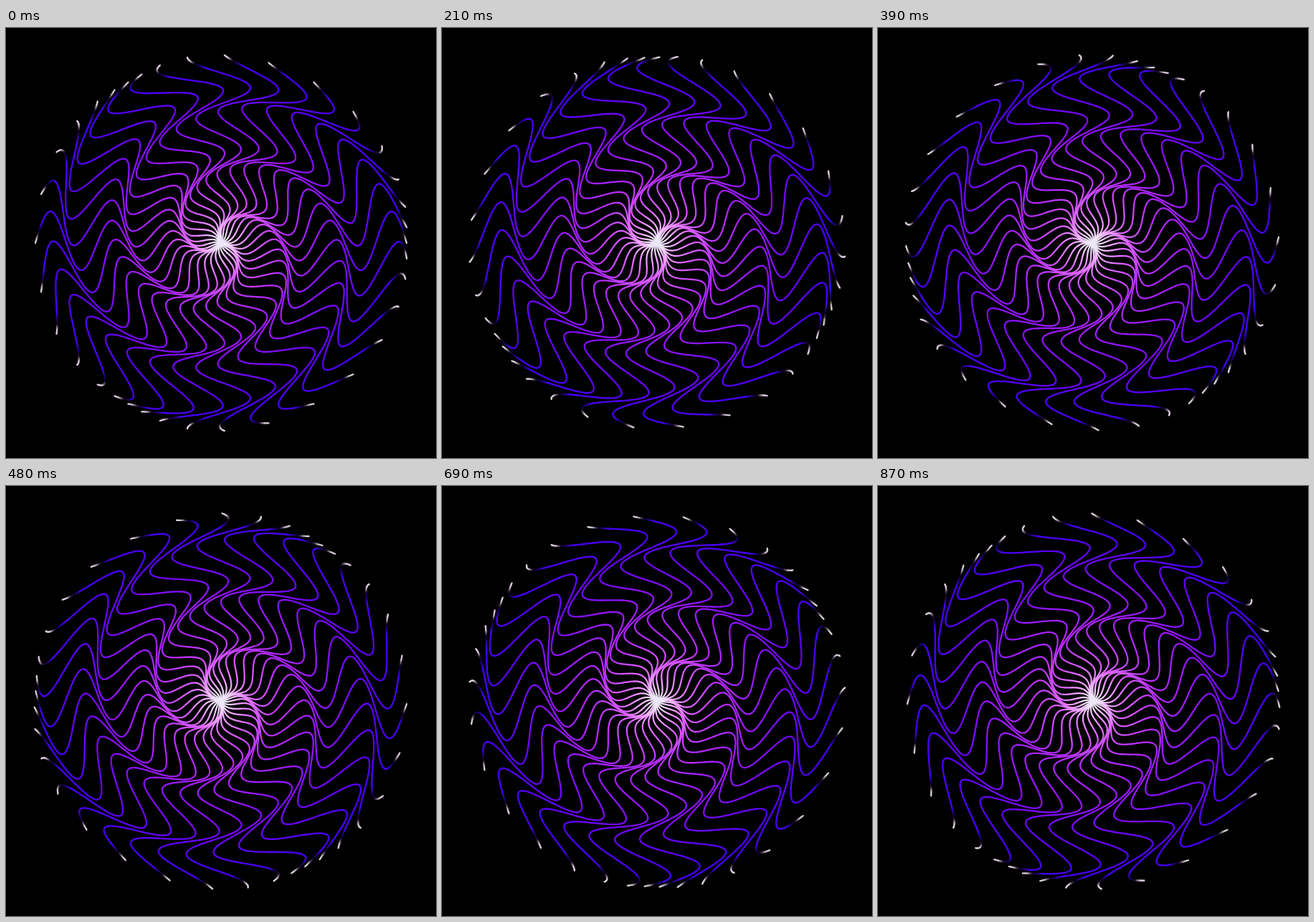
Animation, 600 px wide and 600 px high, one loop 900 ms. Source, as an HTML page with a canvas:

```html
<!DOCTYPE html>
<html lang="en">
<head>
<meta charset="utf-8">
<title>Wavy rays</title>
<style>
  html, body { margin: 0; width: 100%; height: 100%; overflow: hidden; background: #000; }
  canvas { display: block; width: 600px; height: 600px; }
</style>
</head>
<body>
<canvas id="stage" width="600" height="600"></canvas>
<script>
const ctx = document.getElementById('stage').getContext('2d');
const LOOP = 900, STEP = 30;
const RAYS = 36, R = 259, C = 300;
const AMP = 47, WAVES = 3, POWER = 0.75;
const TAU = Math.PI * 2;

const body = ctx.createRadialGradient(C, C, 0, C, C, R);
[
  [0, '#ebe9f3'], [0.035, '#efe4f8'], [0.09, '#f0a8ff'], [0.18, '#dc62ff'],
  [0.34, '#b82cff'], [0.55, '#9616ff'], [0.75, '#6c04ff'], [0.9, '#4c00ff'], [1, '#4400fa']
].forEach(([at, color]) => body.addColorStop(at, color));

// Colour near a ray's end, by distance along the ray from its tip.
const TIP = [[0, [222, 212, 222]], [7, [205, 190, 208]], [14, [22, 12, 34]], [18, [16, 0, 60]], [31, [70, 0, 255]]];
const TIP_LENGTH = 31;

function tipColor(d) {
  let i = 1;
  while (i < TIP.length - 1 && d > TIP[i][0]) i++;
  const [a, ca] = TIP[i - 1], [b, cb] = TIP[i];
  const f = Math.min(1, (d - a) / (b - a));
  return `rgb(${ca.map((v, n) => Math.round(v + (cb[n] - v) * f)).join(',')})`;
}

// Points from the tip to the centre; the wave shifts them sideways.
function rayPoints(k, u) {
  const base = TAU * (k / RAYS - u / 6);
  const turn = 3 * base - Math.PI + TAU * u;
  const cos = Math.cos(base), sin = Math.sin(base);
  const points = [];
  for (let r = R; r >= 0; r--) {
    const w = AMP * Math.pow(r / R, POWER) * Math.sin(turn + TAU * WAVES * r / R);
    points.push([C + r * cos - w * sin, C - r * sin - w * cos]);
  }
  return points;
}

function drawRay(points) {
  let i = 1, d = 0;
  for (; d < TIP_LENGTH; i++) {
    const [x0, y0] = points[i - 1], [x1, y1] = points[i];
    const len = Math.hypot(x1 - x0, y1 - y0);
    ctx.strokeStyle = tipColor(d + len / 2);
    ctx.beginPath();
    ctx.moveTo(x0, y0);
    ctx.lineTo(x1, y1);
    ctx.stroke();
    d += len;
  }
  ctx.strokeStyle = body;
  ctx.beginPath();
  points.slice(i - 1).forEach(([x, y]) => ctx.lineTo(x, y));
  ctx.stroke();
}

function draw(ms) {
  const u = Math.floor((ms % LOOP + 1) / STEP) * STEP / LOOP;
  ctx.fillStyle = '#000';
  ctx.fillRect(0, 0, 600, 600);
  ctx.lineWidth = 2.3;
  ctx.lineCap = ctx.lineJoin = 'round';
  for (let k = 0; k < RAYS; k++) drawRay(rayPoints(k, u));
}

const start = performance.now();
function tick() {
  draw(performance.now() - start);
  requestAnimationFrame(tick);
}
tick();
</script>
</body>
</html>
```
